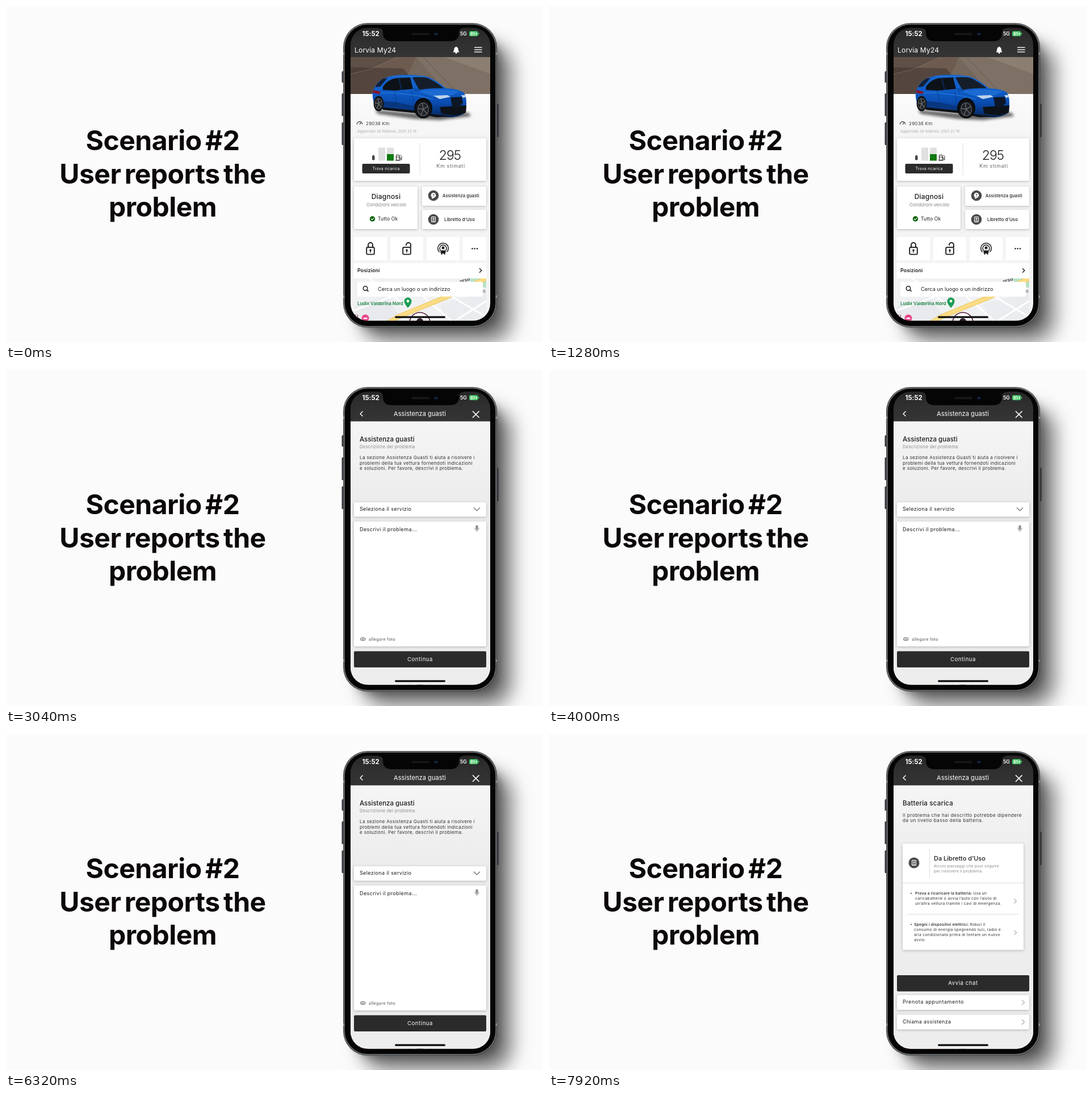
Recreate the animation shown at these times as an HTML page with a canvas. Size 946x592 px, loop 8 s.

```html
<!DOCTYPE html>
<html lang="en">
<head>
<meta charset="utf-8">
<title>Scenario #2</title>
<style>
html, body { margin: 0; width: 100%; height: 100%; overflow: hidden; background: #fbfbfb; }
canvas { display: block; width: 946px; height: 592px; }
</style>
</head>
<body>
<canvas id="stage"></canvas>
<script>
const W = 946, H = 592, LOOP = 8000;
const scale = Math.max(1, window.devicePixelRatio || 1);
const DARK = '#2b2b2b', INK = '#1c1c1c';
const FONT = 'Inter, "Open Sans", sans-serif';
let c;

function layer(paint, canvas = document.createElement('canvas')) {
  canvas.width = W * scale;
  canvas.height = H * scale;
  c = canvas.getContext('2d');
  c.scale(scale, scale);
  paint();
  return canvas;
}

function text(str, x, y, size, { color = INK, weight = 400, align = 'left', gap = 0, wordGap = 0 } = {}) {
  c.font = `${weight} ${size}px ${FONT}`;
  c.letterSpacing = gap + 'px';
  c.wordSpacing = wordGap + 'px';
  c.textAlign = align;
  c.fillStyle = color;
  c.fillText(str, x, y);
  return c.measureText(str).width;
}

function lines(list, x, y, step, size, opts) {
  list.forEach((s, i) => text(s, x, y + i * step, size, opts));
}

function box(x, y, w, h, fill, r = 0) {
  c.fillStyle = fill;
  c.beginPath();
  c.roundRect(x, y, w, h, r);
  c.fill();
}

function card(x, y, w, h, r = 2) {
  c.save();
  c.shadowColor = 'rgba(0,0,0,.26)';
  c.shadowBlur = 4 * scale;
  c.shadowOffsetY = 1 * scale;
  box(x, y, w, h, '#fff', r);
  c.restore();
}

function dot(x, y, r, fill, ry = r) {
  c.fillStyle = fill;
  c.beginPath();
  c.ellipse(x, y, r, ry, 0, 0, 7);
  c.fill();
}

function arc(x, y, r, from, to, color, width = 1) {
  c.strokeStyle = color;
  c.lineWidth = width;
  c.beginPath();
  c.arc(x, y, r, from, to);
  c.stroke();
}

function outline(x, y, w, h, r, color, width = 1) {
  c.strokeStyle = color;
  c.lineWidth = width;
  c.beginPath();
  c.roundRect(x, y, w, h, r);
  c.stroke();
}

function line(points, color, width = 1) {
  c.strokeStyle = color;
  c.lineWidth = width;
  c.beginPath();
  points.forEach(([x, y]) => c.lineTo(x, y));
  c.stroke();
}

function shape(d, fill) {
  c.fillStyle = fill;
  c.fill(new Path2D(d));
}

function fade(x0, y0, x1, y1, ...stops) {
  const g = c.createLinearGradient(x0, y0, x1, y1);
  stops.forEach((s, i) => g.addColorStop(i / (stops.length - 1), s));
  return g;
}

function chevron(x, y, color, s = 4, width = 1) {
  line([[x, y - s], [x + s, y], [x, y + s]], color, width);
}

function homeBar() {
  box(685, 546.5, 89, 3.2, '#0b0b0b', 1.6);
}

function badge(x, y, r, kind) {
  dot(x, y, r, '#4a4a4a');
  if (kind === 'help') {
    dot(x, y - .5, 4.4, '#fff');
    shape(`M${x - 2} ${y + 2}l-1 4l4 -2z`, '#fff');
    text('?', x, y + 2, 6.5, { weight: 700, color: '#444', align: 'center' });
  } else {
    outline(x - 3.4, y - 4.4, 6.8, 8.8, 1, '#fff', 1.1);
    dot(x, y - 1, 1.5, '#fff');
    line([[x - 2, y + 2.3], [x + 2, y + 2.3]], '#fff', 1);
  }
}

function header() {
  box(606, 36, 248, 54.5, fade(0, 40, 0, 90, '#282828', '#303030', '#343434'));
}

function wheel(x, y, rx, ry) {
  dot(x, y, rx, '#111316', ry);
  dot(x, y, rx * .75, '#55595e', ry * .75);
  dot(x, y, rx * .65, '#1e2124', ry * .65);
  for (let i = 0; i < 5; i++) {
    const a = i * Math.PI * .4 - .5;
    line([[x, y], [x + Math.cos(a) * rx * .7, y + Math.sin(a) * ry * .7]], '#64686d', 1.5);
  }
}

function car() {
  c.save();
  c.filter = `blur(${2.5 * scale}px)`;
  shape('M650 183L733 190L815 188L819 194L765 201L720 199L655 190Z', 'rgba(0,0,0,.6)');
  c.restore();
  const paint = fade(0, 122, 0, 195, '#1663c8', '#0f5fca', '#0a4caf', '#06275f');
  // body
  shape('M646 153Q647 143 657 133Q668 123 695 121.500Q727 120 744 125Q760 132 775 145Q797 146 806 152Q811 158 811 171L810 187Q803 194 786 196L757 195L724 188L664 181L650 175Q645 164 646 153Z', paint);
  // glass
  shape('M664 142Q673 129 688 127L712 126L717 146L686 149L664 148Z', '#0d1219');
  shape('M716 126Q732 124 743 127Q758 134 771 145Q748 144 728 148Z', '#151d29');
  shape('M650 143Q655 134 664 128L672 127L659 142Z', '#122038');
  line([[692, 127], [697, 148]], '#0b2f6b', 1.5);
  line([[680, 124], [735, 124]], '#2f7fe0', 1);
  // panels and light edges
  line([[650, 153], [682, 153], [726, 158], [752, 164]], '#2c82e8', 1);
  shape('M660 167L690 170L720 177L718 182L664 177Z', '#08367f');
  line([[683, 149], [688, 164], [687, 181]], '#083a87', .8);
  line([[714, 149], [718, 166], [715, 184]], '#083a87', .8);
  shape('M662 178L720 184L752 191L790 194L758 196L725 189L664 183Z', '#0d1116');
  shape('M726 150Q760 145 800 150L786 157L754 160Z', '#1c6bd2');
  shape('M647 148L660 151L658 155L647 153Z', '#8a1628');
  shape('M718 145l9 0l3 5l-10 1z', '#0c4fae');
  shape('M753 158L778 157L783 160L764 164Z', '#bed3ea');
  shape('M802 157L810 157L811 160L805 162Z', '#bed3ea');
  // front
  shape('M764 178L811 175L810 188L794 193L767 190Z', '#0d1219');
  shape('M783 161L803 160L805 171L796 179L786 177Z', '#0e1726');
  dot(735, 180, 16, '#0a0c0f', 18);
  wheel(656.5, 172, 9, 13.5);
  wheel(735, 182, 13.5, 16);
}

function banner() {
  box(606, 90, 248, 66, '#75675c');
  shape('M606 90H688L640 112L606 120Z', '#5e5047');
  shape('M640 112L690 90H722L692 156H606V120Z', '#6d5b50');
  shape('M722 90H772L854 120V156H780Z', '#7e7065');
  shape('M772 90H854V120Z', '#8c7f72');
  shape('M606 108L700 110L735 156H606Z', 'rgba(52,41,36,.42)');
  line([[690, 90], [640, 112], [606, 120]], '#7c6d61', .8);
  line([[735, 90], [798, 156]], '#66584e', 1);
  box(606, 155, 248, 72, fade(0, 155, 0, 225, '#fbfbfb', '#f5f5f5'));
}

function padlock(x, open) {
  outline(x - 6.8, 425.2, 13.6, 12.4, 1.5, INK, 1.9);
  const sx = open ? x + 3 : x;
  c.beginPath();
  c.moveTo(sx - 4, open ? 422 : 425);
  c.lineTo(sx - 4, 421);
  c.arc(sx, 421, 4, Math.PI, 0);
  c.lineTo(sx + 4, 425);
  c.stroke();
  dot(x, 430.2, 1.7, INK);
  line([[x, 430], [x, 434.5]], INK, 1.5);
}

function map() {
  c.save();
  c.beginPath();
  c.rect(613, 480, 233, 75);
  c.clip();
  box(613, 480, 233, 75, '#f0f1f3');
  shape('M613 530L670 512L700 555H613Z', '#e8eaed');
  shape('M815 480H846V497L822 490Z', '#b9e2c6');
  shape('M765 525L846 505V555H775Z', '#eaecef');
  for (const [x, y, x2, y2] of [[640, 480, 740, 555], [735, 512, 785, 555], [785, 512, 846, 548], [613, 536, 680, 512], [790, 555, 846, 520]])
    line([[x, y], [x2, y2]], '#fff', 3);
  const road = [[660, 566], [692, 547], [775, 513], [846, 480]];
  line(road, '#ecc964', 8.5);
  line(road, '#fbdc85', 6.5);
  c.save();
  c.translate(800, 488);
  c.rotate(-.25);
  text('orso', 0, 0, 8.5, { weight: 600, color: '#3d3d3d' });
  c.restore();
  text('lo', 838, 505, 8, { color: '#444' });
  c.restore();
  box(619, 486, 221, 26, '#fff', 2);
  arc(633, 497.5, 3.7, 0, 7, INK, 1.5);
  line([[635.7, 500.2], [638.5, 503]], INK, 1.7);
  text('Cerca un luogo o un indirizzo', 655, 501.5, 9, { gap: .1 });
  text('Ludix Valdorina Nord', 619, 526.5, 8, { weight: 600, color: '#15803d' });
  shape('M708 532Q701.5 525 701.5 520A6.5 6.5 0 0 1 714.5 520Q714.5 525 708 532Z', '#1f9d55');
  dot(708, 520, 2.4, '#e8fff0');
  text('EL', 613, 551, 8.5, { weight: 500, color: '#8c2450' });
  dot(633, 550, 6.5, '#e9468b');
  box(629.5, 549, 7, 2.6, '#fff', 1);
  dot(729, 558, 19, 'rgba(255,255,255,.65)');
  arc(729, 558, 18, 0, 7, '#501f3b', 1.7);
  dot(729, 556, 6, '#30202a');
}

function homePage() {
  box(606, 36, 248, 520, '#f4f4f5');
  header();
  text('Lorvia My24', 614, 81.5, 12, { color: '#fff', gap: .2 });
  shape('M787.5 81.5Q789.3 79.5 789.3 76Q789.6 72.8 792 72.2Q793 70.6 794 72.2Q796.4 72.8 796.7 76Q796.7 79.5 798.5 81.5Z', '#fff');
  dot(793, 82.6, 1.5, '#fff');
  for (const y of [73, 77, 81]) line([[825, y], [838.5, y]], '#fff', 1.4);
  banner();
  car();

  arc(623, 208.5, 4.7, Math.PI, 0, '#444', 1.4);
  line([[623, 208.5], [625.5, 205.5]], '#444', 1.2);
  text('29038 Km', 634, 209.5, 8, { color: '#3a3a3a', gap: .25 });
  text('Aggiornato 26 febbraio, 2025 22:19', 619, 222.5, 6, { color: '#a9a9a9', gap: .1 });

  card(613, 233, 233, 75);
  box(645, 264, 4.5, 7.5, '#444', 1);
  box(646, 262.8, 2.5, 1.5, '#444');
  box(656, 249.5, 12, 23, '#e0e0e0');
  box(671, 249.5, 12, 23, '#e0e0e0');
  box(671, 261, 12, 11.5, '#117a11');
  outline(687.5, 262.5, 5.5, 9, 1, '#333', 1.2);
  line([[686, 272], [694.5, 272]], '#333', 1.2);
  line([[688, 266], [693, 266]], '#333', 1);
  line([[693, 267], [695, 267], [695, 271], [697, 271], [697, 265], [694.5, 262.5]], '#333', 1);
  box(627.5, 278, 84, 17, DARK, 2);
  text('Trova ricarica', 669.5, 289, 7, { color: '#fff', align: 'center', gap: .2 });
  line([[729, 242], [729, 298]], '#dedede');
  text('295', 782, 271, 23, { weight: 300, align: 'center', gap: -1 });
  text('Km stimati', 783.5, 285, 9, { color: '#666', align: 'center', gap: .6 });

  card(613, 318, 112, 75);
  text('Diagnosi', 669.5, 339.5, 12, { weight: 500, align: 'center', gap: .2 });
  text('Condizioni veicolo', 670, 353, 8, { color: '#808080', align: 'center', gap: .05 });
  dot(645.5, 375, 4.7, '#0d650d');
  line([[643.3, 375], [645, 376.8], [648, 373.4]], '#fff', 1.1);
  text('Tutto Ok', 655, 378, 8.5, { gap: .15 });

  card(733, 318, 113, 34);
  badge(753, 334, 9.3, 'help');
  text('Assistenza guasti', 769, 336.5, 7.5, { weight: 500, gap: .1 });
  card(733, 359, 113, 34);
  badge(753, 376, 9.3, 'book');
  text('Libretto d’Uso', 772, 378.5, 7.8, { weight: 500, gap: .12 });

  for (const [x, w] of [[613, 58], [677, 58], [741, 58], [805, 41]]) box(x, 407, w, 41, '#fff', 1);
  padlock(642, false);
  padlock(706, true);
  for (const r of [6, 9.3]) arc(770, 427, r, 2.35, 7.07, INK, 1.5);
  dot(770, 426, 2.5, INK);
  box(765.5, 430.5, 9, 5.5, INK, 2);
  box(766.5, 435, 2, 3, INK);
  box(771.5, 435, 2, 3, INK);
  for (const x of [821.5, 825.7, 830]) dot(x, 427.5, 1.3, INK);

  map();
  box(613, 453, 233, 27, '#fff', 2);
  text('Posizioni', 619, 469, 8.8, { weight: 600, gap: .1 });
  chevron(834, 466, INK, 3.8, 1.4);
  homeBar();
}

function subPage() {
  box(606, 36, 248, 520, '#ededee');
  box(606, 90, 248, 144, fade(0, 90, 0, 234, '#f5f5f5', '#ececed'));
  header();
  line([[628.5, 72.8], [624, 77.2], [628.5, 81.6]], '#fff', 1.4);
  text('Assistenza guasti', 729, 81, 11, { color: '#fff', align: 'center', gap: .05 });
  line([[822, 72.5], [833.5, 84]], '#fff', 1.7);
  line([[833.5, 72.5], [822, 84]], '#fff', 1.7);
}

function wideButton(label, y) {
  box(613, y, 233, 28.5, DARK, 2);
  text(label, 729.5, y + 17.3, 9.5, { color: '#fff', align: 'center', gap: .6 });
}

function formPage() {
  subPage();
  text('Assistenza guasti', 623, 126, 11.5, { weight: 500 });
  text('Descrizione del problema', 623, 137.5, 7.5, { color: '#8a8a8a', gap: .3 });
  lines(['La sezione Assistenza Guasti ti aiuta a risolvere i',
    'problemi della tua vettura fornendoti indicazioni',
    'e soluzioni. Per favore, descrivi il problema.'], 623, 157, 9.5, 8.2, { color: '#333', gap: .3 });
  card(613, 233, 233, 25.5);
  text('Seleziona il servizio', 623, 248, 9, { gap: .35 });
  line([[824, 242.5], [829.5, 248], [835, 242.5]], '#666', 1.1);
  card(613, 267, 233, 220);
  text('Descrivi il problema...', 623, 283.5, 9, { gap: .4 });
  box(827.5, 273.5, 4, 7.5, '#888', 2);
  arc(829.5, 278.5, 3.7, 0, Math.PI, '#888', 1);
  line([[829.5, 282], [829.5, 285]], '#888', 1);
  outline(624.5, 471.7, 8.5, 4.8, 2.4, '#555');
  line([[626.5, 474.2], [631, 474.2]], '#555', 1.1);
  text('allegare foto', 639, 476.5, 7.3, { color: '#555', gap: .3 });
  wideButton('Continua', 495.5);
}

function tip(x, y, lead, first, rest) {
  const opts = { color: '#333', gap: .2 };
  dot(638, y - 2.3, 1, '#333');
  const w = text(lead, x, y, 6.8, { ...opts, weight: 600 });
  text(first, x + w + 2, y, 6.8, opts);
  lines(rest, x, y + 9.2, 9.2, 6.8, { ...opts, gap: .3 });
}

function resultPage() {
  subPage();
  text('Batteria scarica', 623, 126, 11.5, { weight: 500, gap: .2 });
  lines(['Il problema che hai descritto potrebbe dipendere', 'da un livello basso della batteria.'],
    623, 145.5, 9.7, 8.2, { color: '#333', gap: .45 });
  card(623, 193, 213, 187.5);
  badge(643, 227, 9.5, 'book');
  line([[670.5, 202], [670.5, 254]], '#dedede');
  text('Da Libretto d’Uso', 678, 222.5, 11, { weight: 500 });
  lines(['Alcuni passaggi che puoi seguire', 'per risolvere il problema.'], 678, 235, 8.7, 6.8, { color: '#888', gap: .27 });
  line([[623, 262.5], [836, 262.5]], '#dcdcdc');
  tip(645, 283, 'Prova a ricaricare la batteria:', 'Usa un',
    ['caricabatterie o avvia l’auto con l’aiuto di', 'un’altra vettura tramite i cavi di emergenza.']);
  line([[631, 317.5], [828, 317.5]], '#dcdcdc');
  tip(643, 337.7, 'Spegni i dispositivi elettrici:', 'Riduci il',
    ['consumo di energia spegnendo luci, radio e', 'aria condizionata prima di tentare un nuovo', 'avvio.']);
  chevron(819.5, 294.5, '#777');
  chevron(819.5, 350, '#777');
  wideButton('Avvia chat', 425);
  card(613, 460, 233, 26);
  text('Prenota appuntamento', 623, 475, 9, { gap: .55 });
  chevron(833, 473, '#777', 4.5);
  card(613, 494.5, 233, 26);
  text('Chiama assistenza', 623, 510, 9, { gap: .35 });
  chevron(833, 507.5, '#777', 4.5);
  homeBar();
}

function backdrop() {
  box(0, 0, W, H, '#fbfbfb');
  const title = { weight: 700, color: '#0c0808', align: 'center', gap: -.5, wordGap: -4.5 };
  lines(['Scenario #2', 'User reports the', 'problem'], 276, 254, 58.5, 48, title);

  for (const [blur, shift, alpha] of [[34, 29, .55], [14, 10, .25]]) {
    c.save();
    c.shadowColor = `rgba(0,0,0,${alpha})`;
    c.shadowBlur = blur * scale;
    c.shadowOffsetX = c.shadowOffsetY = shift * scale;
    box(600, 40, 261, 522, '#222', 38);
    c.restore();
  }
  for (const [y, h] of [[115, 20], [154, 40], [205, 40]]) box(591.5, y, 4, h, '#3b3d40', 1.5);
  box(863.5, 172, 4.5, 59, '#3b3d40', 1.5);
  box(594, 30, 271, 536.5, '#3a3c3e', 43);
  outline(595.7, 31.7, 267.6, 533.1, 41.5, '#7d8083', 1.2);
  box(597, 33, 265, 530.5, '#050505', 40);
  for (const x of [594, 862.5]) for (const y of [82, 510]) box(x, y, 2.5, 4, '#888b8e');
}

function overlay() {
  shape('M656 36H806V39Q798 39 798 46V47Q798 62 783 62H679Q664 62 664 47V46Q664 39 656 39Z', '#050505');
  box(714, 47.5, 32, 4, '#171717', 2);
  dot(757.5, 49.5, 3.5, '#0b101b');
  dot(756, 49.5, 1.1, '#244a91');
  dot(759.3, 49.5, 1, '#203e76');
  text('15:52', 627.5, 52.7, 11.3, { weight: 700, color: '#fff', gap: .1 });
  text('5G', 800, 52.3, 8.7, { weight: 600, color: '#fff' });
  box(816, 44.3, 15.5, 9, '#43c565', 2.5);
  box(832, 47, 1.3, 3.5, '#43c565', .6);
  text('81', 818, 51.7, 7.5, { weight: 700, color: '#fff', gap: -.3 });
  shape('M829.2 45.5L826.3 49.4H828.2L827.5 52.3L830.5 48.2H828.5Z', '#fff');
}

const back = layer(backdrop);
const home = layer(homePage);
const form = layer(formPage);
const result = layer(resultPage);
const bar = layer(homeBar);
const front = layer(overlay);
const stage = document.getElementById('stage');
layer(() => {}, stage);
const ctx = stage.getContext('2d');

function ramp(t, from, to) {
  const p = Math.min(1, Math.max(0, (t - from) / (to - from)));
  return p * p * (3 - 2 * p);
}

function put(image, alpha = 1) {
  if (!alpha) return;
  ctx.globalAlpha = alpha;
  ctx.drawImage(image, 0, 0, W, H);
  ctx.globalAlpha = 1;
}

function draw(now) {
  const t = now % LOOP;
  put(back);
  ctx.save();
  ctx.beginPath();
  ctx.roundRect(607, 38.5, 246, 516, 30);
  ctx.clip();
  put(home);
  put(form, ramp(t, 1440, 1800));
  put(bar, ramp(t, 1880, 2080));
  put(result, ramp(t, 7520, 7880));
  ctx.restore();
  put(front);
  requestAnimationFrame(draw);
}
requestAnimationFrame(draw);
</script>
</body>
</html>
```
